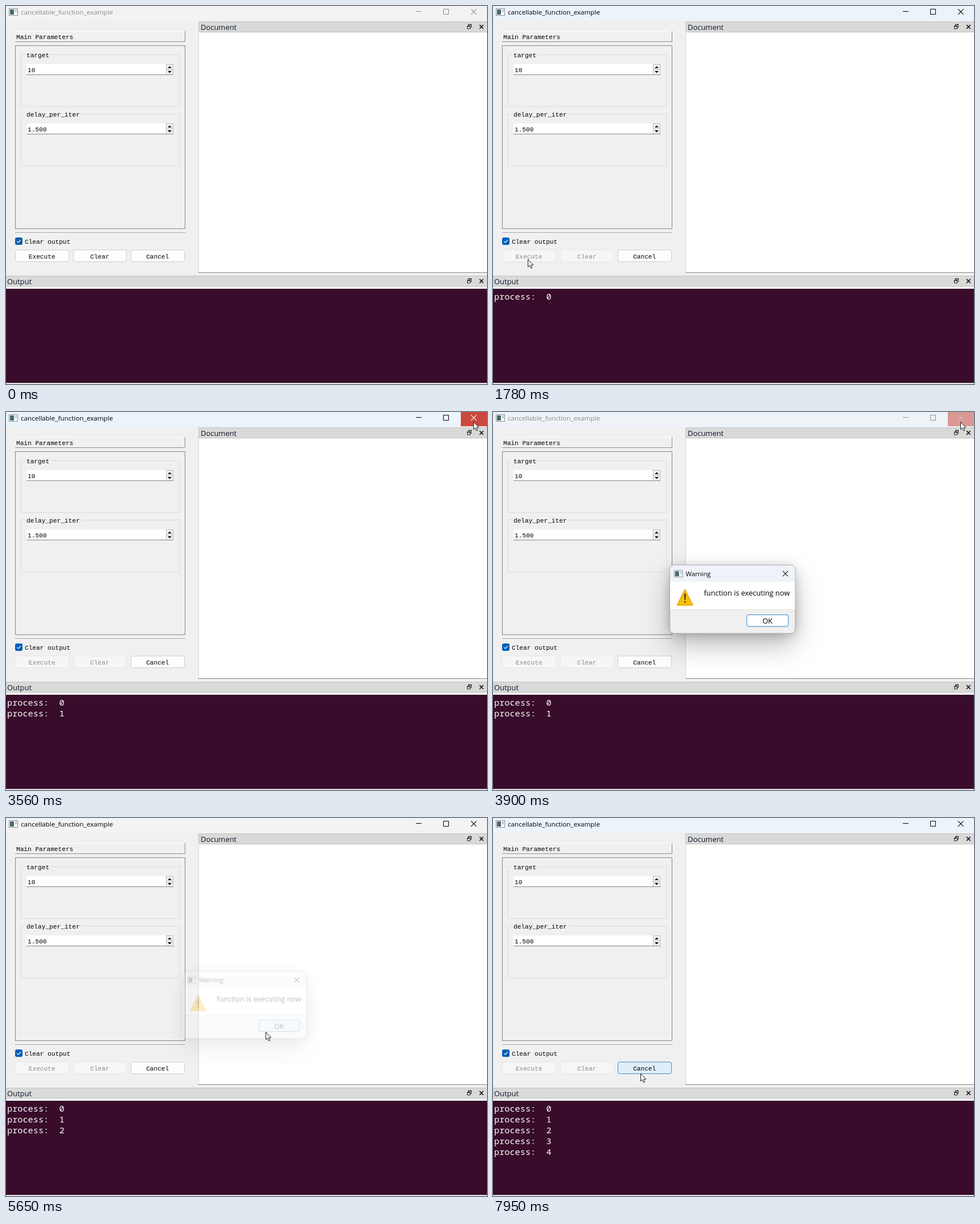
Write an HTML page that moves like this. It is 845 px wide and 663 px high and loops after 8 s.

```html
<!DOCTYPE html>
<html lang="en">
<head>
<meta charset="utf-8">
<title>Cancellable function</title>
<style>
  html, body { margin: 0; width: 100%; height: 100%; overflow: hidden; background: #f0f0f0; }
  svg { display: block; width: 100%; height: 100%; }
  text { white-space: pre; }
  .title { font: 11.65px "Open Sans", sans-serif; }
  .ui { font: 12.95px "Open Sans", sans-serif; }
  .message { font: 13.15px "Open Sans", sans-serif; }
  .form { font: 11.15px "Liberation Mono", monospace; }
  .term { font: 500 15.25px "Noto Sans Mono", monospace; fill: #fff; }
  .mid { text-anchor: middle; }
  .line { fill: none; stroke-width: 1; }
  .near { filter: drop-shadow(0 2px 10px rgba(0, 0, 0, .25)); }
  .far { filter: drop-shadow(0 22px 24px rgba(0, 0, 0, .28)); }
</style>
</head>
<body>
<svg id="stage" viewBox="0 0 845 663" preserveAspectRatio="none"></svg>
<script>
const LOOP = 8000;
const PRESS = 1300, RUN = 1585, ROW_DELAY = 1502, ROWS = 5;
const CLOSE_PRESS = 3560, OPEN = 3750, OK_PRESS = 5390, SHUT = 5530;

// Markup helpers
const rect = (x, y, w, h, fill, extra = '') =>
  `<rect x="${x}" y="${y}" width="${w}" height="${h}" fill="${fill}" ${extra}/>`;
const text = (x, y, cls, str, extra = '') => `<text x="${x}" y="${y}" class="${cls}" ${extra}>${str}</text>`;
const path = (d, stroke, width = 1, extra = '') =>
  `<path d="${d}" class="line" stroke="${stroke}" style="stroke-width:${width}" ${extra}/>`;
const cross = (x, y, s) => `M${x} ${y}l${s} ${s}m0 ${-s}l${-s} ${s}`;

const appIcon = (x, y) =>
  rect(x + .5, y + .5, 15, 12, '#fbfbfb', 'stroke="#8b8f92"') +
  rect(x + 2, y + 2, 7, 9, '#456a6c') +
  rect(x + 11, y + 2, 3, 5, '#c3cacc');

const dockBar = (x, y, label, textX, hover = '') =>
  rect(x + .5, y + .5, 845 - x, 18, '#d9d9d9', 'stroke="#c6c6c6"') + hover +
  text(textX, y + 15, 'ui', label, 'fill="#0b1526"') +
  path(`M812.5 ${y + 7.5}v-2h5v5h-2M810.5 ${y + 8}h5v5h-5z`, '#222') +
  path(`M812 ${y + 5.5}h6M810 ${y + 8.5}h6`, '#222', 1.6) +
  path(cross(832, y + 6.2, 6.6), '#222', 1.7);

const spinBox = (y, value) =>
  rect(36, y, 258, 18, '#fff') +
  [.5, 9.5].map(dy => rect(281.5, y + dy, 12, 9, '#f3f3f3', 'stroke="#b9b9b9"')).join('') +
  `<path d="M284 ${y + 7}h7l-3.5 -3.6zM284 ${y + 12}h7l-3.5 3.6z"/>` +
  path(`M36 ${y + 18.5}h258`, '#868686') +
  text(38, y + 14, 'form', value);

const groupBox = (y, label, gapEnd, value) =>
  path(`M33 ${y + .5}H26.5v91h278.5v-91H${gapEnd}`, '#dbdbdb') +
  text(36, y + 5, 'form', label) +
  spinBox(y + 17, value);

const button = (id, x, w, label) =>
  `<g id="${id}">` +
  rect(x, 428, w, 20.5, '#fdfdfd', 'rx="3" stroke="#d0d0d0"') +
  text(x + w / 2 - .3, 443, 'form mid', label) + '</g>';

const dialog = '<g id="dialog">' +
  ['far', 'near'].map(c => rect(311, 270, 223, 119, '#f0f0f0', `rx="8" class="${c}"`)).join('') +
  rect(309.5, 268, 226.5, 123, '#f0f0f0', 'rx="7.5" stroke="#a9a9a9"') +
  '<path d="M310 298v-22.5a7 7 0 0 1 7-7h211.5a7 7 0 0 1 7 7v22.5z" fill="#eff3f9"/>' +
  rect(310, 298, 225.5, 50, '#fff') +
  path('M310 348.5h225.5', '#e1e1e1') +
  appIcon(317, 277) +
  text(338, 288, 'title', 'Warning') +
  path(cross(513.5, 278.5, 9.5), '#111', 1.1) +
  '<path d="M336.7 312.5L350.5 339.8H323z" fill="#fdc00f" stroke="#f0b010" stroke-width="2.4" stroke-linejoin="round"/>' +
  '<path d="M335.5 319.5h2.6l-.5 11h-1.6z" fill="#222"/>' +
  '<circle cx="336.8" cy="334.2" r="1.4" fill="#222"/>' +
  text(371, 323, 'message', 'function is executing now') +
  rect(448.5, 357.5, 75, 21, '#fff', 'id="okFace" rx="3" stroke="#2f7fbd"') +
  text(486, 373.3, 'ui mid', 'OK') + '</g>';

let rows = '';
for (let n = 0; n < ROWS; n++) {
  rows += text(2, 514.6 + 19.1 * n, 'term', `process:\u00a0\u00a0${n}`, `id="row${n}"`);
}

document.getElementById('stage').innerHTML =
  rect(0, 0, 845, 26, '#f3f3f3', 'id="titleBar"') +
  appIcon(5, 4) +
  text(26, 15, 'title', 'cancellable_function_example', 'id="caption"') +
  path('M720 9.5h10M768.5 5.5h9v9h-9z', '#000', 1, 'id="winKeys"') +
  rect(799, 0, 46, 25, '#c42b1c', 'id="closeFace"') +
  path(cross(817, 5.3, 9.6), '#000', 1.1, 'id="closeMark"') +
  // document pane
  rect(338, 47, 507, 420, '#fff') +
  path('M338 467.5h507', '#858585') +
  path('M338.5 47v420', '#d6d6d6') +
  dockBar(338, 27, 'Document', 342, rect(803, 27, 22, 19, '#dfebf5', 'id="floatHover"')) +
  // parameter pane
  path('M16 44.5h299', '#fff') +
  path('M16 62.5h298.5V44', '#8d8d8d') +
  text(18, 58, 'form', 'Main Parameters') +
  rect(16.5, 69.5, 298, 321, 'none', 'stroke="#858585"') +
  groupBox(85, 'target', 78, '10') +
  groupBox(189, 'delay_per_iter', 132, '1.500') +
  path('M16 397.5h299', '#a0a0a0') +
  path('M16 398.5h299', '#fff') +
  rect(16, 406, 13, 13, '#005fb8', 'id="check" rx="3"') +
  path('M19.3 412.6l2.3 2.3 4.3-4.5', '#fff', 1.2) +
  text(33, 417, 'form', 'Clear output') +
  button('execute', 16.5, 94, 'Execute') +
  button('clear', 118.5, 93, 'Clear') +
  button('cancel', 219.5, 94, 'Cancel') +
  // output pane
  dockBar(0, 473, 'Output', 2) +
  rect(0, 496, 845, 165, '#380c2a') +
  path('M0 661.5h845', '#d4d4d4') +
  rows + dialog +
  '<path id="cursor" d="M.5 .5V13.7L3.5 10.9L5.6 15.9L7.7 15L5.7 10.2H9.7Z" fill="#fff" stroke="#111" stroke-width=".95"/>';

const $ = id => document.getElementById(id);
const set = (id, attrs) => { for (const k in attrs) $(id).setAttribute(k, attrs[k]); };
const show = (id, on) => set(id, { visibility: on ? 'visible' : 'hidden' });

// Motion helpers
const ramp = (t, start, length) => Math.min(1, Math.max(0, (t - start) / length));
const easeOut = (k, power = 2) => 1 - (1 - k) ** power;
const mix = (a, b, k) => `rgb(${a.map((v, i) => Math.round(v + (b[i] - v) * k))})`;
const grey = v => [v, v, v];

const STOPS = [
  { from: 600, to: 1000, x: 61, y: 444 },   // Execute
  { from: 1800, to: 2820, x: 818, y: 27 },  // dock float key
  { from: 2900, to: 3100, x: 821, y: 17 },  // window close
  { from: 3930, to: 4520, x: 437, y: 381 },
  { from: 4660, to: 4990, x: 456, y: 375 }, // OK
  { from: 5670, to: 6140, x: 248, y: 478 },
  { from: 6870, to: 7150, x: 258, y: 455 },
  { from: 7680, to: 7810, x: 259, y: 448 }  // Cancel
];

function cursorAt(t) {
  let x = 190, y = 438;
  for (const stop of STOPS) {
    const k = easeOut(ramp(t, stop.from, stop.to - stop.from), 2.3);
    x += (stop.x - x) * k;
    y += (stop.y - y) * k;
  }
  return [Math.round(x), Math.round(y)];
}

function paintButton(id, enabled, hover = 0) {
  const [face, label] = $(id).children;
  face.setAttribute('fill', enabled ? mix(grey(253), [224, 238, 249], hover) : '#f6f6f6');
  face.setAttribute('stroke', enabled ? mix(grey(205), [60, 140, 200], hover) : '#e7e7e7');
  label.setAttribute('fill', enabled ? '#000' : '#8a8a8a');
}

function paintWindow(t) {
  const active = (t >= PRESS && t < OPEN) || t >= SHUT + 50;
  const ink = grey(active ? 0 : 140);
  const tint = ramp(t, 1370, 130) - ramp(t, OPEN, 350) + ramp(t, 5650, 210);
  const red = ramp(t, 2970, 60) - ramp(t, OPEN, 280);
  set('titleBar', { fill: mix(grey(243), [235, 243, 251], tint) });
  set('caption', { fill: mix(ink, ink, 0) });
  set('winKeys', { stroke: mix(ink, ink, 0) });
  set('closeFace', { opacity: red, fill: t >= CLOSE_PRESS && t < OPEN ? '#c94a3d' : '#c42b1c' });
  set('closeMark', { stroke: mix(ink, grey(255), red) });
  set('check', { fill: t < PRESS ? '#125fa6' : '#005fb8' });
}

function paintDialog(t) {
  const open = easeOut(ramp(t, OPEN - 10, 300));
  const shut = ramp(t, SHUT, 160);
  const scale = .87 + .13 * open - .06 * shut;
  show('dialog', open > 0 && shut < 1);
  set('dialog', {
    opacity: Math.min(1, open * 1.3) - shut,
    transform: `translate(354 293) scale(${scale}) translate(-354 -293)`
  });
  const pressed = t >= OK_PRESS && t < SHUT;
  set('okFace', { fill: pressed ? '#cce4f7' : mix(grey(255), [224, 238, 249], ramp(t, 4790, 140)) });
}

function paintCursor(t) {
  const glimpse = t >= 130 && t < 200;
  const [x, y] = glimpse ? [322, 618] : cursorAt(t);
  show('cursor', glimpse || t >= 600);
  set('cursor', { transform: `translate(${x} ${y})` });
  show('floatHover', x >= 803 && x < 825 && y >= 27 && y < 46);
}

function render(t) {
  paintWindow(t);
  paintButton('execute', t < RUN, ramp(t, 690, 140));
  paintButton('clear', t < RUN);
  paintButton('cancel', true, ramp(t, 7730, 200));
  for (let n = 0; n < ROWS; n++) show('row' + n, t >= RUN + n * ROW_DELAY);
  paintDialog(t);
  paintCursor(t);
}

const begin = performance.now();
function tick() {
  render((performance.now() - begin) % LOOP);
  requestAnimationFrame(tick);
}
tick();
</script>
</body>
</html>
```
